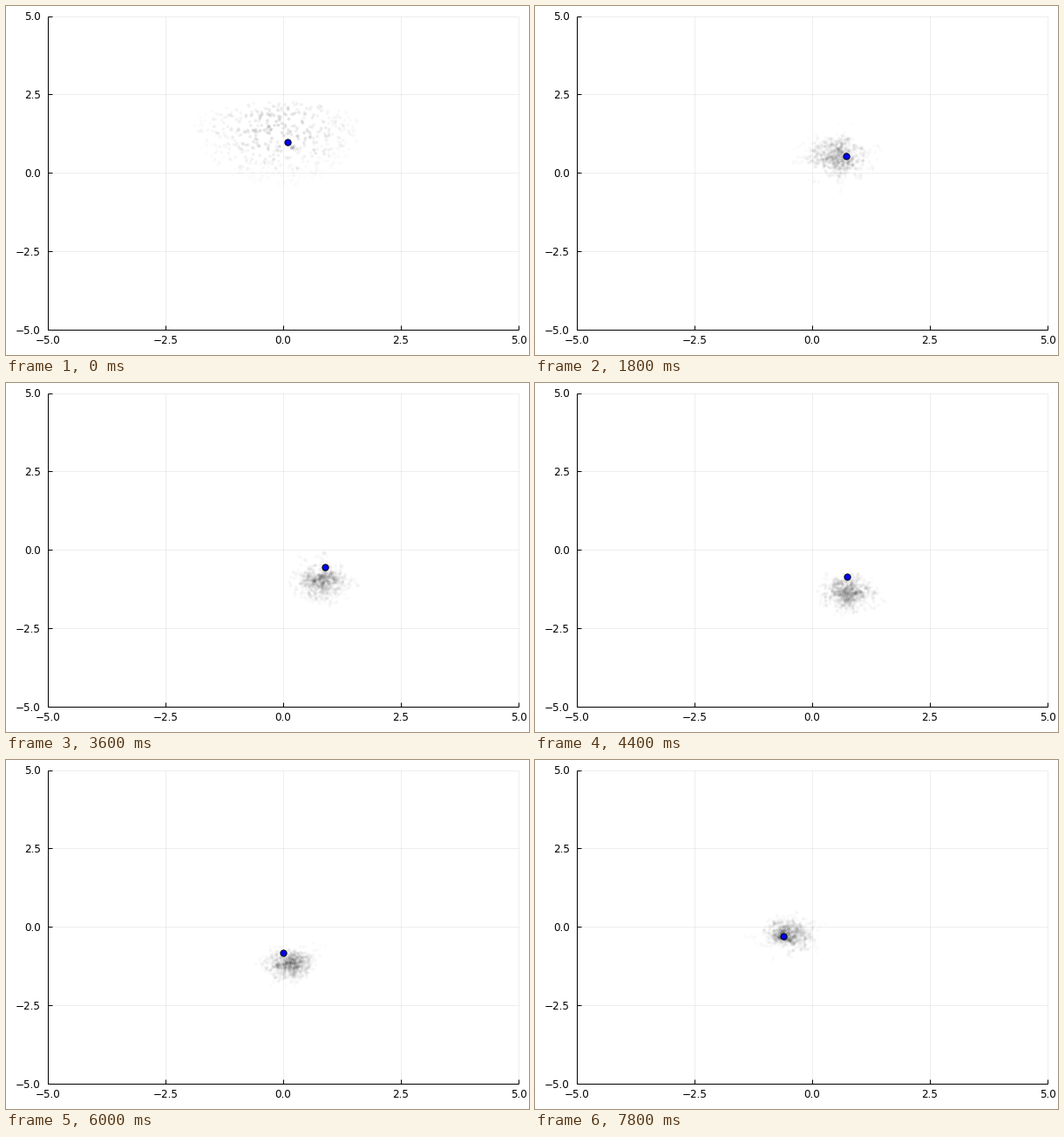
These frames come from a looping animation (600x400 px, 8 s). A matplotlib script:

```python
import numpy as np
import matplotlib.pyplot as plt
from matplotlib.animation import FuncAnimation

W, H, DPI = 600, 400, 100
FRAMES, STEP_MS = 40, 200
PX = 72 / DPI                      # one pixel in points
LEFT, RIGHT, TOP, BOTTOM = 48, 588, 11.6, 371
TICKS = np.linspace(-5, 5, 5)
PARTICLES, PARENTS = 720, 260

# key points of the tracked body: step, x, y in pixels
PATH = np.array([(0, 323, 156.2), (4, 337.2, 156.2), (9, 357.2, 172), (15, 366.9, 200),
                 (22, 357.9, 222), (30, 318, 220.5), (39, 284.8, 202.2)])


def body_at(t):
    """Cubic Hermite curve through the key points."""
    times, points = PATH[:, 0], PATH[:, 1:]
    slopes = np.gradient(points, times, axis=0)
    i = int(np.clip(np.searchsorted(times, t) - 1, 0, len(times) - 2))
    h = times[i + 1] - times[i]
    u = (t - times[i]) / h
    return ((1 + 2 * u) * (1 - u) ** 2 * points[i] + u * (1 - u) ** 2 * h * slopes[i]
            + u * u * (3 - 2 * u) * points[i + 1] + u * u * (u - 1) * h * slopes[i + 1])


def first_cloud(rng):
    """Wide spread of particles, darkest in the middle and fading outwards."""
    x = rng.uniform(214, 410, 680)
    y = rng.uniform(110, 208, 680)
    reach = np.where(y < 136, 26, 72)
    inside = ((x - 311) / 95) ** 2 + ((y - 136) / reach) ** 2 < 1
    x, y = x[inside], y[inside]
    fade = ((x - 314) / 46) ** 2 + ((y - 142) / 26) ** 2
    alpha = 0.105 * np.exp(-fade / 2) * rng.uniform(0.5, 1.2, len(x)) + 0.005
    return x, y, alpha


def later_cloud(t, rng):
    """Resampled particles: children scattered round their parents."""
    bx, by = body_at(t)
    cx = bx - 10 * np.cos(np.pi * (t - 10) / 22)
    cy = by - 20 + 38 * np.sin(np.pi * t / 46)
    spread = 13.5 + 11 * np.exp(-t / 9)
    parents = rng.normal(size=(PARENTS, 2))
    p = parents[rng.integers(0, PARENTS, PARTICLES)] * 0.96
    p += rng.normal(size=p.shape) * 0.22
    alpha = 0.013 + 0.031 * np.exp(-(p ** 2).sum(axis=1) / 5)
    alpha *= rng.uniform(0.7, 1.2, PARTICLES)
    return cx + spread * p[:, 0], cy + 0.66 * spread * p[:, 1], alpha


def draw_axes(ax):
    def line(xs, ys, alpha=1):
        ax.plot(xs, ys, color="black", alpha=alpha, lw=PX,
                solid_capstyle="butt", zorder=1 + alpha)

    font = dict(family="DejaVu Sans", size=12 * PX, va="baseline")
    for v in TICKS:
        x = LEFT + (v + 5) * (RIGHT - LEFT) / 10
        y = BOTTOM - (v + 5) * (BOTTOM - TOP) / 10
        line([x, x], [TOP, BOTTOM], 0.065)
        line([LEFT, RIGHT], [y, y], 0.065)
        line([x, x], [BOTTOM, BOTTOM - 5])
        line([LEFT, LEFT + 5], [y, y])
        label = f"{v:.1f}".replace("-", "\u2212")
        ax.text(x, 387, label, ha="center", **font)
        ax.text(40, y + 4.7, label, ha="right", **font)
    line([LEFT, LEFT, RIGHT], [TOP, BOTTOM, BOTTOM])


fig = plt.figure(figsize=(W / DPI, H / DPI), dpi=DPI, facecolor="white")
ax = fig.add_axes([0, 0, 1, 1])
ax.set_xlim(0, W)
ax.set_ylim(H, 0)
ax.axis("off")
draw_axes(ax)

dots = ax.scatter([], [], s=(3.8 * PX) ** 2, linewidths=0, zorder=3)
body, = ax.plot([], [], "o", ms=7.2 * PX, mfc="blue", mec="black", mew=PX, zorder=4)


def update(t):
    rng = np.random.default_rng(100 + t)
    x, y, alpha = first_cloud(rng) if t == 0 else later_cloud(t, rng)
    dots.set_offsets(np.column_stack([x, y]))
    colors = np.zeros((len(x), 4))
    colors[:, 3] = alpha
    dots.set_facecolors(colors)
    bx, by = body_at(t)
    body.set_data([bx], [by])
    return dots, body


anim = FuncAnimation(fig, update, frames=FRAMES, interval=STEP_MS,
                     repeat=True, repeat_delay=0, blit=False)
plt.show()
```
